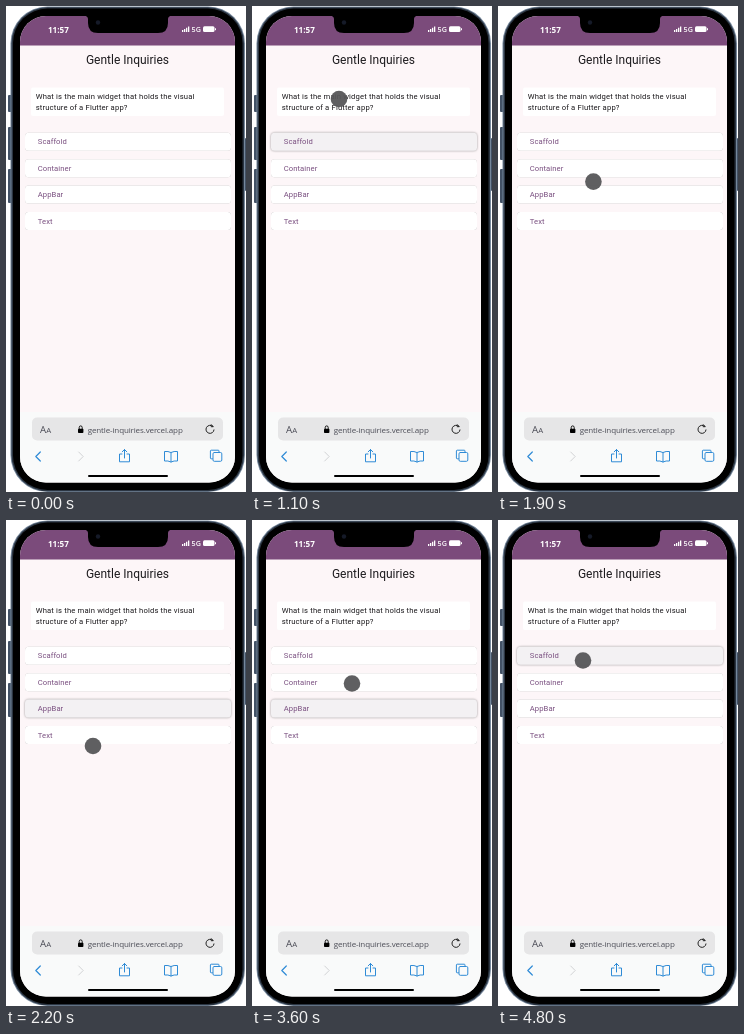
Write an HTML page that moves like this. It is 240x486 px and loops after 4.9 s.

```html
<!DOCTYPE html>
<html lang="en">
<head>
<meta charset="utf-8">
<title>Quiz on a phone</title>
<style>
  html, body { margin: 0; width: 100%; height: 100%; overflow: hidden; background: #fff; }
  svg { display: block; width: 240px; height: 486px; font-family: Roboto, sans-serif; }
  .ui { font-family: "Open Sans", sans-serif; }
  .icon { fill: none; stroke: #2f8bd6; stroke-linecap: round; stroke-linejoin: round; }
  .body { font-size: 7.66px; letter-spacing: .155px; fill: #1d1b1e; }
  .option text { font-size: 7.66px; letter-spacing: .055px; fill: #7a5080; }
  .option rect { fill: #fff; filter: drop-shadow(0 .6px .6px #4446); }
  .option .hover { fill: #f3f1f3; filter: drop-shadow(0 .8px .8px #4448); }
</style>
</head>
<body>
<svg viewBox="0 0 240 486">
  <defs>
    <clipPath id="screen"><rect x="14" y="10" width="215" height="466.500" rx="26"/></clipPath>
  </defs>

  <!-- Phone body -->
  <g fill="#435266">
    <rect x="2" y="89" width="4" height="17" rx="1"/>
    <rect x="2" y="121" width="4" height="33" rx="1"/>
    <rect x="2" y="163" width="4" height="34" rx="1"/>
    <rect x="236" y="132" width="4" height="53" rx="1"/>
  </g>
  <rect x="4.500" y=".5" width="234.500" height="485.500" rx="37" fill="#75879b"/>
  <rect x="5.500" y="1.300" width="232.500" height="483.900" rx="36" fill="#2b3542"/>
  <rect x="7" y="2.500" width="229.500" height="481.500" rx="34.500"/>

  <g clip-path="url(#screen)">
    <rect x="14" y="9" width="215" height="470" fill="#fdf6f8"/>
    <rect x="14" y="9" width="215" height="30.500" fill="#7b4b7b"/>
    <rect x="14" y="406" width="215" height="73" fill="#f9fafa"/>
  </g>
  <path d="M78 9.500Q82 10 82 13V17Q82 27 92 27H152Q162 27 162 17V13Q162 10 166 9.500Z"/>
  <circle cx="92" cy="16.500" r="2.200" fill="#151a28"/>

  <!-- Status bar -->
  <g fill="#fff" class="ui" font-weight="700">
    <text x="42" y="26.800" font-size="8.100">11:57</text>
    <path d="M176 24h1.300v2h-1.300zM178 23h1.300v3h-1.300zM180 21.800h1.300v4.200h-1.300zM182 20.500h1.300v5.500h-1.300z"/>
    <text x="185.600" y="26" font-size="7.200" font-weight="600">5G</text>
    <rect x="197" y="20.200" width="11.500" height="5.800" rx="1.500"/>
    <rect x="209" y="22" width="1" height="2.200" rx=".5"/>
  </g>

  <text x="121.500" y="58" font-size="12" text-anchor="middle" fill="#1d1b1e">Gentle Inquiries</text>
  <rect x="25" y="81.500" width="193" height="28.500" rx="2" fill="#fff"/>
  <text class="body" x="29.700" y="93">What is the main widget that holds the visual</text>
  <text class="body" x="29.700" y="104">structure of a Flutter app?</text>
  <g id="options"></g>

  <!-- Address bar -->
  <rect x="26" y="411.500" width="191" height="23" rx="5" fill="#e6e6e7"/>
  <g class="ui" fill="#4b4c56">
    <text x="34" y="427" font-size="9.700">A<tspan font-size="7.800">A</tspan></text>
    <text x="81.700" y="426.500" font-size="8" letter-spacing="-.13">gentle-inquiries.vercel.app</text>
  </g>
  <rect x="72" y="422.700" width="5.400" height="4.300" rx=".8"/>
  <path d="M73.200 423v-1.500a1.500 1.600 0 0 1 3 0v1.500" fill="none" stroke="#000" stroke-width=".9"/>
  <path d="M206.800 420.500a4 4 0 1 0 1.200 3M204.800 420.700h2.600M205 418.300l2.200 2.300" fill="none" stroke="#222"/>

  <!-- Toolbar -->
  <g class="icon">
    <path d="M34.300 446l-4.500 4.500 4.500 4.500" stroke-width="1.200"/>
    <path d="M72.700 446l4.500 4.500-4.500 4.500" stroke="#d2d3d5"/>
    <path d="M116 448h-2.500v7.800h10V448H121M118.500 452v-8.500M116.200 445.800l2.300-2.300 2.300 2.300"/>
    <path d="M165 446.500q-3-1.500-6.500-1v9.500q3.500-.5 6.500 1q3-1.500 6.500-1v-9.500q-3.500-.5-6.500 1v9.500"/>
    <path d="M206.500 452.800h-1.300q-.8 0-.8-.8V445q0-.8.8-.8h7q.8 0 .8.8v1.200"/>
    <rect x="207" y="446.500" width="8.800" height="8.800" rx="1.300"/>
  </g>
  <rect x="82" y="469" width="80" height="2" rx="1"/>

  <circle id="pointer" r="8.300" fill="#555557" fill-opacity=".94"/>
</svg>
<script>
const LOOP = 4900, STEP = 100, HOVER_LAG = 200;
const labels = ["Scaffold", "Container", "AppBar", "Text"];
const centerY = i => 135.700 + i * 26.450;

const options = document.getElementById("options");
options.innerHTML = labels.map((label, i) => `
  <g class="option">
    <rect x="19" y="${centerY(i) - 9}" width="206" height="18" rx="3.500"/>
    <text x="31.800" y="${centerY(i) + 2.500}">${label}</text>
  </g>`).join("");
const cards = options.querySelectorAll("rect");
const pointer = document.getElementById("pointer");

// Pointer path: time, x, y
const path = [
  [600, 72, 222], [900, 80, 138], [1100, 87, 93], [1300, 101, 103], [1500, 109, 118],
  [2000, 92, 190], [2200, 87, 226], [2500, 89, 235], [2900, 96, 210], [3000, 98, 197],
  [3100, 99, 188], [3400, 100, 181], [3600, 100, 163.500], [4200, 93, 156],
  [4600, 87, 143], [4800, 85, 140.500]
];

function pointerAt(t) {
  if (t < path[0][0]) return null;
  const next = path.findIndex(p => p[0] >= t);
  if (next < 1) return path.at(next).slice(1);
  const [t0, x0, y0] = path[next - 1], [t1, x1, y1] = path[next];
  const k = (t - t0) / (t1 - t0);
  return [x0 + (x1 - x0) * k, y0 + (y1 - y0) * k];
}

function draw(now) {
  const t = Math.floor(now % LOOP / STEP) * STEP;
  const spot = pointerAt(t), hover = pointerAt(t - HOVER_LAG);
  pointer.style.display = spot ? "" : "none";
  if (spot) pointer.setAttribute("transform", `translate(${spot})`);
  cards.forEach((card, i) => {
    const hovered = hover && Math.abs(hover[1] - centerY(i)) < 10;
    card.classList.toggle("hover", Boolean(hovered));
  });
}

const start = performance.now();
function tick() {
  draw(performance.now() - start);
  requestAnimationFrame(tick);
}
tick();
</script>
</body>
</html>
```
